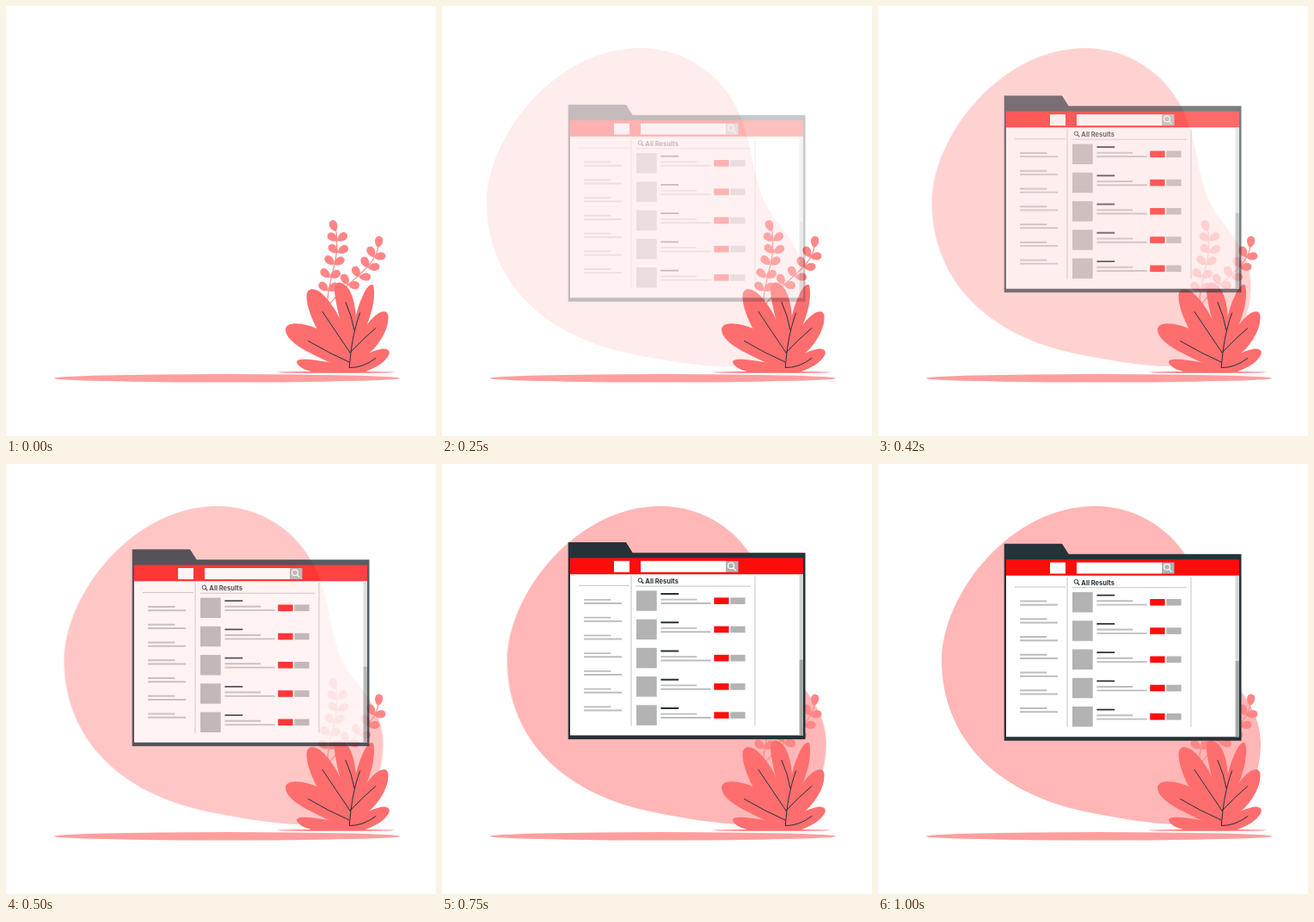
These frames come from a looping animation (500 px wide and 500 px high, 1040 ms). An HTML page:

```html
<!DOCTYPE html>
<html lang="en">
<head>
<meta charset="utf-8">
<title>All Results</title>
<style>
  html, body { margin: 0; width: 100%; height: 100%; overflow: hidden; background: #fff; }
  svg { display: block; width: 100vw; height: 100vh; }
  .slide {
    animation: 1s cubic-bezier(.36, -.01, .5, 1.38) both paused;
    animation-delay: calc(var(--p, 0) * -1s);
  }
  #blob { animation-name: from-left; }
  #window { animation-name: from-below; }
  @keyframes from-left { from { opacity: 0; transform: translateX(-30px); } to { opacity: 1; transform: none; } }
  @keyframes from-below { from { opacity: 0; transform: translateY(30px); } to { opacity: 1; transform: none; } }
  text { font: 700 7.5px Inter, Roboto, sans-serif; fill: #263238; }
</style>
</head>
<body>
<svg id="stage" viewBox="0 0 500 500">
  <defs>
    <path id="leaf" d="M0 0C-6-3.5-6.3-13.5 0-13.5S6-3.5 0 0"/>
  </defs>

  <path id="blob" class="slide" fill="#ffb6b6" d="M74 228C75 150 155 49 252 49C305 49 345 80 364 117
    C388 165 379 210 411 250C432 276 445 297 445 325C445 370 422 419 351 419
    C318 419 275 411 240 404C128 380 74 310 74 228Z"/>
  <ellipse cx="257" cy="432.8" rx="201.5" ry="4.7" fill="#ff9e9e"/>

  <g id="twigs" fill="#ff8686">
    <path d="M373.500 347C375 312 388 300 384 262M376 347C396 320 430 305 433 279" fill="none" stroke="#ff8686" stroke-width="1.2"/>
  </g>

  <g fill="#ff6e6e">
    <ellipse cx="383.500" cy="425.800" rx="68.500" ry=".9"/>
    <path d="M399 425C374 402 349 360 349.500 337C350 327 360 327 369 336C386 353 399 380 403 425Z"/>
    <path d="M399 425C364 408 325 394 325 376C326 365 350 369 364 376C383 386 396 404 402 425Z"/>
    <path d="M402 425H355C346 423 338 418 338 413.500C340 409 356 411 368 413C384 415 394 419 402 425Z"/>
    <path d="M399 425C398 392 381 346 382 328C383 319 391 320 397 327C408 341 411 375 402 425Z"/>
    <path d="M398 425C401 394 404 360 414 339C418 329 423 322 427 324.500C431 341 423 366 413 386C407 399 403 411 402 425Z"/>
    <path d="M398 425C402 395 418 368 432 358C438 354 444 354 444.500 361C445 378 432 397 417 408C410 414 404 419 401 425Z"/>
    <path d="M396 425C406 410 424 401 438 398.500C445 398 447 402 445 406C440 415 429 421 418 425Z"/>
  </g>
  <path fill="none" stroke="#263238" stroke-linecap="round" d="M399.300 420C401 398 404 378 411.500 357M395 344.500Q402 360 405 377
    M368 355.500Q383 378 400 403M430 374.500Q414 388 400 403M351.500 389.500Q376 404 399 414M430 409.500Q415 421 399.300 420.500"/>

  <g id="window" class="slide">
    <path fill="#263238" d="M146.700 92.700H214L221.700 104.800H422.500V321.800H146.700Z"/>
    <path fill="#fff" d="M149 129H420V317.200H149Z"/>
    <path fill="#ff0d0d" d="M149 111H420V129.800H149Z"/>
    <path fill="#fff" d="M200 114.500H218V127.500H200ZM231 114.500H330V127.500H231Z"/>
    <path fill="#b3b3b3" d="M330 114.500H344.500V127.500H330Z"/>
    <g fill="none" stroke="#fff" stroke-width="1.200">
      <circle cx="336" cy="119.800" r="3.400"/><path d="M338.400 122.200L341.500 125.300"/>
    </g>
    <path fill="#d6d6d6" d="M415.600 129.800H420V229H415.600Z"/>
    <path fill="#a6a6a6" d="M415.600 229H420V317.200H415.600Z"/>
    <path stroke="#c4c4c4" d="M159 143H218M225.500 143.700H359M220 131.500V306M364 131.500V306"/>
    <g fill="none" stroke="#263238" stroke-width="1">
      <circle cx="230.400" cy="136.800" r="2.300"/><path d="M232 138.400L234.300 140.700" stroke-width="1.300"/>
    </g>
    <text x="236.300" y="140.700">All Results</text>
  </g>
</svg>
<script>
  const NS = 'http://www.w3.org/2000/svg';
  const $ = id => document.getElementById(id);

  function add(parent, tag, attrs) {
    const el = document.createElementNS(NS, tag);
    for (const key in attrs) el.setAttribute(key, attrs[key]);
    parent.append(el);
  }
  const box = (x, y, width, height, fill) => add($('window'), 'rect', { x, y, width, height, fill });
  const bar = (x, y, width, fill) =>
    add($('window'), 'rect', { x, y: y - 0.95, width, height: 1.9, rx: 0.6, fill });

  // Twig leaves: x, y of the joint, then the angles growing from it
  const joints = [
    [383.5, 262, -22], [385.5, 273, -55, 52], [386, 287, -50, 58], [381.5, 300.5, -48, 58],
    [376.5, 315.5, -48, 61], [374.5, 331, -48, 57],
    [432.5, 281, 8], [428, 292, -28, 82], [421, 304, -27, 85], [410.500, 315, -27, 90],
    [397.500, 324, -27, 95], [387, 334.5, 98]
  ];
  for (const [x, y, ...angles] of joints)
    for (const a of angles)
      add($('twigs'), 'use', { href: '#leaf', transform: `translate(${x} ${y}) rotate(${a})` });

  for (let i = 0; i < 7; i++) {
    const y = 159.5 + i * 20.75;
    bar(165, y, 31.5, '#bdbdbd');
    bar(165, y + 4.2, 44, '#bdbdbd');
  }
  for (let i = 0; i < 5; i++) {
    const y = 149 + i * 33.25;
    box(226, y, 23.7, 23.5, '#b3b3b3');
    bar(254.3, y + 3.6, 21, '#263238');
    bar(254.3, y + 10.3, 42, '#bdbdbd');
    bar(254.3, y + 14.6, 58.5, '#bdbdbd');
    box(316.3, y + 8, 17.3, 7.6, '#ff0d0d');
    box(335.3, y + 8, 17.3, 7.6, '#b3b3b3');
  }

  // Motion runs at 24 steps per second
  const start = performance.now();
  function tick() {
    const t = (performance.now() - start) % 1040;
    const step = Math.floor(t * 0.024 + 0.17);
    $('stage').style.setProperty('--p', step < 2 ? 0 : Math.min(1, (step + 0.5) / 24));
    requestAnimationFrame(tick);
  }
  tick();
</script>
</body>
</html>
```
